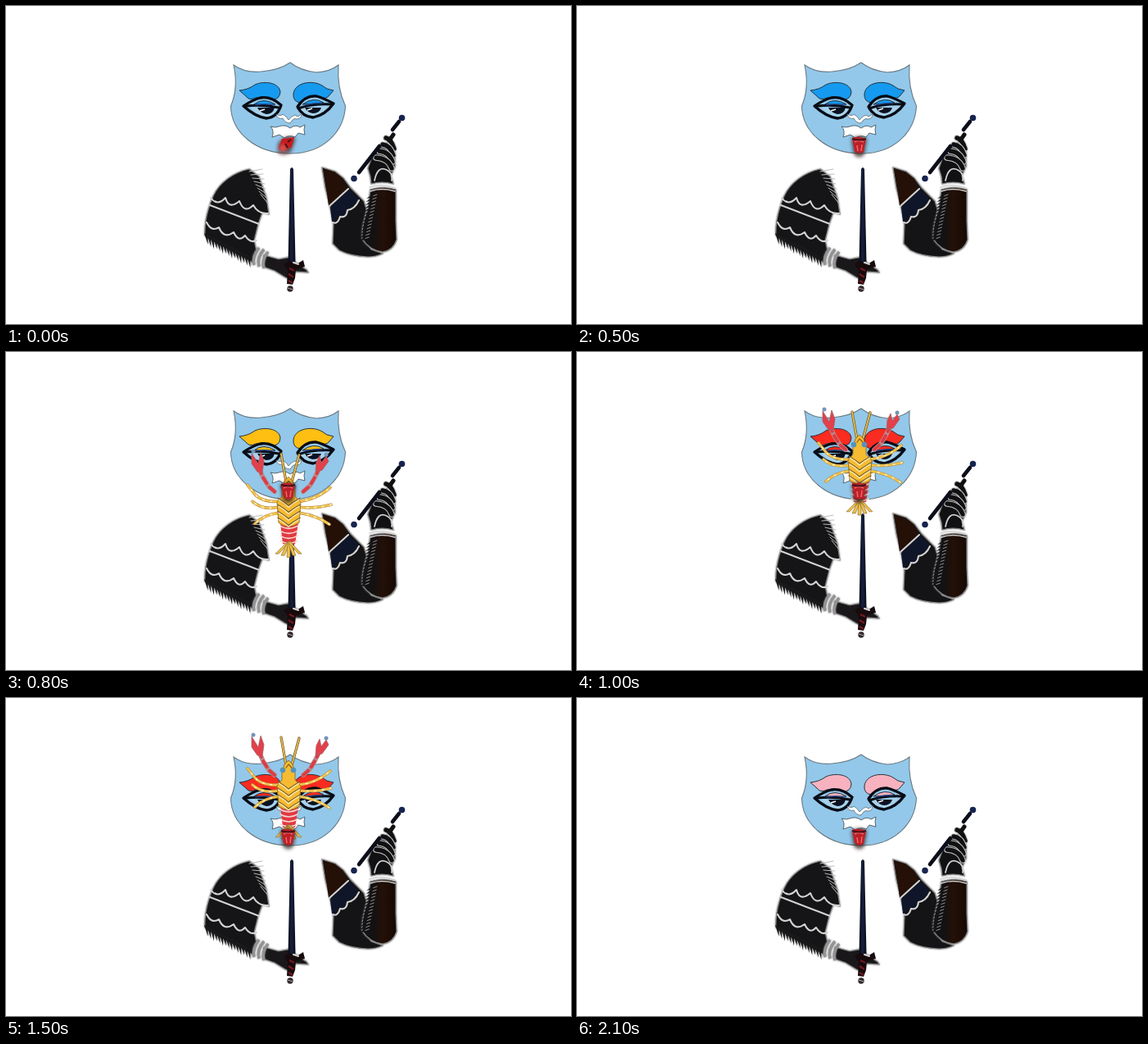
An HTML page for the animation above (2200 ms loop, 690 by 388 pixels).

```html
<!DOCTYPE html>
<html lang="en">
<head>
<meta charset="utf-8">
<title>Mask and lobster</title>
<style>
html, body { margin: 0; width: 100%; height: 100%; overflow: hidden; background: #fff; }
svg { display: block; width: 100vw; height: 100vh; }
.soft { stroke: #858585; stroke-width: 1.2; filter: blur(.6px) drop-shadow(0 0 1px #777); }
.line { fill: none; stroke: #d3d3d3; stroke-width: 2.1; stroke-linejoin: round; stroke-linecap: round; filter: blur(.4px); }
.ink { fill: none; stroke: #070b14; stroke-linecap: round; stroke-linejoin: round; }
</style>
</head>
<body>
<svg viewBox="0 0 690 388">
<defs>
  <clipPath id="window"><rect x="0" y="37" width="690" height="351"/></clipPath>
  <linearGradient id="blade"><stop stop-color="#080a14"/><stop offset=".5" stop-color="#18203e"/><stop offset="1" stop-color="#080a14"/></linearGradient>
  <linearGradient id="cuff"><stop offset=".3" stop-color="#121113"/><stop offset=".6" stop-color="#241007"/><stop offset="1" stop-color="#140904"/></linearGradient>
  <filter id="smear" x="-50%" y="-50%" width="200%" height="200%"><feGaussianBlur stdDeviation="2"/></filter>
</defs>

<g id="leftArm">
  <g class="soft" fill="#151517">
    <path d="M297 199C278 203 261 215 253 232C247 246 242 262 243 280L256 290L275 301L301 313L306 299L303 286L308 266L313 252L321 254L318 234L309 208Z"/>
    <path d="M315 304L333 309L344 307L351 311L367 322L369 325L353 324L349 334L341 331L328 323L314 318Z" fill="#191719"/>
  </g>
  <g id="leftFringe"></g>
  <path class="line" d="M250 234Q258 245 268 234Q272 249 285 238Q291 254 302 243Q308 254 320 253"/>
  <path class="line" d="M249 243L309 266"/>
  <path class="line" d="M245 264Q251 276 260 270Q266 285 278 276Q284 289 292 280Q298 290 306 286"/>
  <path class="soft" d="M309 295Q300 306 303 316M315 297Q306 307 309 318M320 300Q312 310 315 320" fill="none" style="stroke:#929292;stroke-width:3.4"/>
</g>

<g id="sword">
  <path d="M347 199Q349 195 351 199L353.5 312H344.5Z" fill="url(#blade)"/>
  <path d="M339 315L346 311L355 315L363 310L365 318L354 321L353 332L350 340L343 339L344 322Z" fill="#170b0d"/>
  <path d="M346 320L352 323M345 327L351 331M345 335L350 338" stroke="#741a20" stroke-width="2.2"/>
  <circle cx="347" cy="345" r="3.7" fill="#30282a"/>
  <path d="M344 344L350 346" stroke="#b5a6a6"/>
  <path d="M351 313L357 315" class="line" stroke-width="1.2"/>
</g>

<g id="rightArm">
  <path class="soft" d="M386 197L402 202L412 210L421 222L437 238L440 248L437 265L437 284L446 297L460 302Q452 306 442 306Q420 305 407 298L399 290L400 267L396 246L390 222Z" fill="#141416"/>
  <path d="M387 198L402 203L411 210L417 222L394 244L391 221Z" fill="#241007"/>
  <path d="M396 246L419 224L430 235Q424 247 416 247Q415 259 405 256Q401 265 398 263Z" fill="#10162a"/>
  <path class="line" d="M395 244L418 223M399 264Q405 267 408 257Q416 259 417 249Q426 248 431 237"/>
  <path class="soft" d="M445 224Q460 219 476 224L476 263L477 285Q473 298 460 300Q444 298 435 284Q434 268 442 248Z" fill="url(#cuff)"/>
  <g id="rightFringe"></g>
  <path class="line" d="M444 221Q459 216 475 222M445 226Q459 221 475 226" style="stroke-width:1.7"/>
  <path class="soft" d="M446 217L445 208L442 198L446 187L456 170L466 166L475 178L475 196L470 207L473 217Q459 213 446 217Z" fill="#111113"/>
  <g id="fingers"></g>
  <path class="line" d="M450 213Q454 194 465 200Q473 204 471 213" style="stroke-width:1.7"/>
  <path d="M431 203L456 171M472 151L480 141" stroke="#0c0e1a" stroke-width="4.6" stroke-linecap="round"/>
  <circle cx="425" cy="210.5" r="3.8" fill="#17244f"/><circle cx="483.5" cy="136.5" r="3.8" fill="#17244f"/>
</g>

<g id="mask">
  <path d="M278 72Q292 82 312 80Q334 78 347 69Q360 79 379 81Q396 80 406 72Q404 100 414.500 122C413 153 388 180 347 180C305 180 275 154 274.500 122Q284 100 278 72Z" fill="#93c8ea" stroke="#6a7a83" stroke-width="1.1"/>
  <path d="M289 121Q313 101 336 120Q331 136 318 137Q304 135 289 121ZM401 119Q377 101 355 123Q362 135 375 136Q390 133 401 119Z" fill="#93c8ea"/>
  <g id="shadows" stroke="#26333b" stroke-width="1">
    <path d="M285 103Q296 102 304 96C315 91 334 93 335 105Q334 115 324 114Q316 109 305 112Q297 116 293 110Z"/>
    <path d="M400 103Q391 102 386 97C374 90 353 93 351 107Q350 117 360 118Q370 109 382 111Q391 114 394 110Z"/>
    <path d="M303 120Q314 111 329 120Z"/>
    <path d="M362 120Q376 110 388 118Z"/>
  </g>
  <path d="M299 124L332 124Q327 135 317 135Q307 133 299 124ZM359 125L393 122Q385 133 374 134Q364 132 359 125Z" fill="#a9d2ea"/>
  <path d="M307 124H328Q326 132 318 132Q310 130 307 124ZM365 124H385Q383 131 375 131Q368 130 365 124Z" fill="#0a1222"/>
  <path d="M310 128L316 126M368 127L374 125" stroke="#fff" stroke-width="1.5"/>
  <path class="ink" stroke-width="3.3" d="M290 122Q302 114 311 112Q324 110 336 121Q331 136 318 137Q304 135 290 122ZM400 119Q387 112 379 110Q365 109 356 123Q362 135 375 136Q390 133 400 119Z"/>
  <path class="ink" stroke-width="3" d="M293 122Q315 120 333 124M357 125Q374 119 397 120"/>
  <path d="M304 121Q316 118 328 121M364 121Q376 118 386 119" fill="none" stroke="#294da3" stroke-width="1"/>
  <path d="M330 132Q336 135 338 132Q343 135 345 139Q349 134 353 133Q357 137 361 131Q361 138 355 138Q351 136 347 143Q341 143 338 137Q332 139 330 132Z" fill="#fff" stroke="#5b6b74" stroke-width=".8"/>
  <path d="M323 147Q329 149 333 147Q341 144 347 149Q354 144 359 148L365 145Q363 151 365 157L357 155L353 160Q346 157 340 161L334 157L325 160Q328 152 323 147Z" fill="#fff" stroke="#4a575e" stroke-width=".9"/>
</g>

<g clip-path="url(#window)"><g id="lobster"></g></g>

<g id="tongue">
  <path d="M335 162Q344 156 354 162L351 181Q345 188 338 181Z" fill="#33201f" opacity=".75" filter="url(#smear)"/>
  <path d="M336 161Q344 158 353 162L350 178Q344 182 339 177Z" fill="#bd2028"/>
  <path d="M339 166Q344 163 350 166M342 170L343 177M348 169L347 177" fill="none" stroke="#f0686a" stroke-width="1.5"/>
  <path d="M336 162Q345 165 353 162" fill="none" stroke="#471217" stroke-width="2"/>
</g>
<g id="lick">
  <path d="M332 168Q342 155 354 162L348 178Q340 184 332 179Z" fill="#4c3432" opacity=".8" filter="url(#smear)"/>
  <path d="M337 162L352 160L349 172L338 177L333 173Z" fill="#c51c20"/>
  <ellipse cx="338" cy="174" rx="5" ry="5" fill="#d76865" opacity=".7" filter="url(#smear)"/>
  <path d="M341 168L344 173M348 163L344 166" stroke="#491014" stroke-width="2"/>
</g>
</svg>
<script>
const FRAME = 100, FRAMES = 22;
const el = id => document.getElementById(id);
const stroke = (d, color, width, extra = "") =>
  `<path d="${d}" fill="none" stroke="${color}" stroke-width="${width}" stroke-linecap="round" stroke-linejoin="round" ${extra}/>`;
const fill = (d, color, extra = "") => `<path d="${d}" fill="${color}" ${extra}/>`;
const dot = (x, y, r, color) => `<circle cx="${x}" cy="${y}" r="${r}" fill="${color}"/>`;

function buildArmDetails() {
  let left = "", right = "", fingers = "";
  for (let i = 0; i < 15; i++) {
    const x = 244 + i * 3.7, y = 277 + i * 1.9;
    left += fill(`M${x - 2} ${y}L${x + 3} ${y + 2}L${x + 2.5} ${y + 14 + i % 3}Z`, "#19191b");
    left += stroke(`M${x + 3} ${y + 8}l1 5`, "#bbb", .8);
  }
  for (let i = 0; i < 8; i++)
    left += stroke(`M${297 + i * 2} ${202 + i * 4}l${16 - i} ${-3 + i * 2}`, "#bdbdbd", 1);
  for (let i = 0; i < 14; i++) {
    const y = 230 + i * 4, x = 446 - i * .75;
    right += stroke(`M${x - 1} ${y + 3}l8 -3`, "#b5b0ae", .8);
    right += fill(`M${x + 3} ${y - 1}L${x - 6} ${y + 5}L${x + 2} ${y + 3}Z`, "#161416");
  }
  for (let i = 0; i < 4; i++) {
    const d = `M${464 - i * 4} ${161 + i * 8}Q${470 - i} ${162 + i * 8} ${474 - i} ${174 + i * 8}`;
    fingers += stroke(d, "#c9c9c9", 7.6) + stroke(d, "#111113", 5.4);
  }
  fingers += stroke("M468 164L473 157", "#111113", 5);
  el("leftFringe").innerHTML = left;
  el("rightFringe").innerHTML = right;
  el("fingers").innerHTML = fingers;
}

const limb = d => stroke(d, "#a98a4c", 3.6) + stroke(d, "#f4c247", 2.6) +
  stroke(d, "#fff3cf", 1.6, 'stroke-dasharray="1.5 8"');

const claw = (d, pincers) => stroke(d, "#b98b8d", 5.6) +
  stroke(d, "#dc3c45", 4, 'stroke-dasharray="8 6"') +
  fill(pincers, "#e2404a", 'stroke="#a8636a" stroke-width=".8"');

function buildLobster() {
  let art = "";
  for (const d of [
    "M334 208Q311 209 303 198L295 188", "M333 215Q313 219 301 208", "M334 222Q315 224 304 235",
    "M357 208Q379 206 396 191", "M358 215Q378 217 397 212", "M358 222Q379 225 395 236"
  ]) art += limb(d);
  art += claw("M328 196L321 190L314 179L310 170",
    "M307 172L300 162L300 149L305 157L308 162L311 148L315 159L313 173Z");
  art += claw("M363 196L371 189L377 179L382 169",
    "M378 171L379 160L383 152L385 161L391 153L394 159L386 170Z");
  art += dot(302, 147, 2.5, "#7594b8") + dot(391, 151, 2.5, "#7594b8");
  for (const d of ["M342 184L336 150", "M349 184L358 151"])
    art += stroke(d, "#685026", 3.2) + stroke(d, "#e9bd4a", 1.8);
  art += fill("M335 234L357 234L353 260L338 260Z", "#e23a42");
  for (let y = 238; y < 257; y += 6)
    art += stroke(`M335 ${y}Q345 ${y + 6} 356 ${y}`, "#f6d9d2", 1.6);
  for (const x of [331, 338, 345, 352, 359]) {
    const y = 276 - Math.abs(x - 345) * .3, tip = `${x - 2} ${y}L${x + 2} ${y}`;
    art += fill(`M344 257L${tip}L347 257Z`, "#efc04a", 'stroke="#8d7038" stroke-width=".7"');
  }
  art += fill("M345 178L350 183L353 193L353 202L360 209L358 234Q345 243 333 234L331 209L337 202L337 193L340 183Z", "#f6bb30", 'stroke="#8a6c30" stroke-width=".9"');
  for (const y of [207, 215, 223, 231])
    art += stroke(`M332 ${y - 3}Q339 ${y + 1} 345 ${y + 6}Q352 ${y + 1} 359 ${y - 3}`, "#7e642f", 1.4) +
      stroke(`M333 ${y - 1}Q340 ${y + 3} 345 ${y + 8}Q351 ${y + 3} 358 ${y - 1}`, "#ffefc7", 1.1);
  art += dot(338, 190, 3.3, "#5593ba") + dot(351, 190, 3.3, "#5593ba");
  art += stroke("M342 187L345 183L349 187", "#80591f", 1.2);
  el("lobster").innerHTML = art;
}

const tint = { b: "#159af0", y: "#ffbe12", m: "#fb3dde", r: "#fa2b20", g: "#169b50", p: "#f8b2bf" };
const lids = "bgpyrbgmyprybrgrbgymrp";
const climb = [[6, 43], [7, 0], [10, -77], [12, -77], [15, -102], [17, -188]];

function climbAt(step) {
  if (step < 6 || step > 17) return null;
  const k = climb.findIndex(([s]) => s >= step);
  if (climb[k][0] === step) return climb[k][1];
  const [s0, y0] = climb[k - 1], [s1, y1] = climb[k];
  return y0 + (y1 - y0) * (step - s0) / (s1 - s0);
}

function draw(time) {
  const step = Math.floor(time / FRAME) % FRAMES;
  const y = climbAt(step);
  el("shadows").setAttribute("fill", tint[lids[step]]);
  el("lobster").style.display = y === null ? "none" : "";
  if (y !== null) el("lobster").setAttribute("transform", `translate(0 ${y})`);
  el("tongue").style.display = step ? "" : "none";
  el("lick").style.display = step ? "none" : "";
}

buildArmDetails();
buildLobster();
const start = performance.now();
function tick() {
  draw(performance.now() - start);
  requestAnimationFrame(tick);
}
tick();
</script>
</body>
</html>
```
